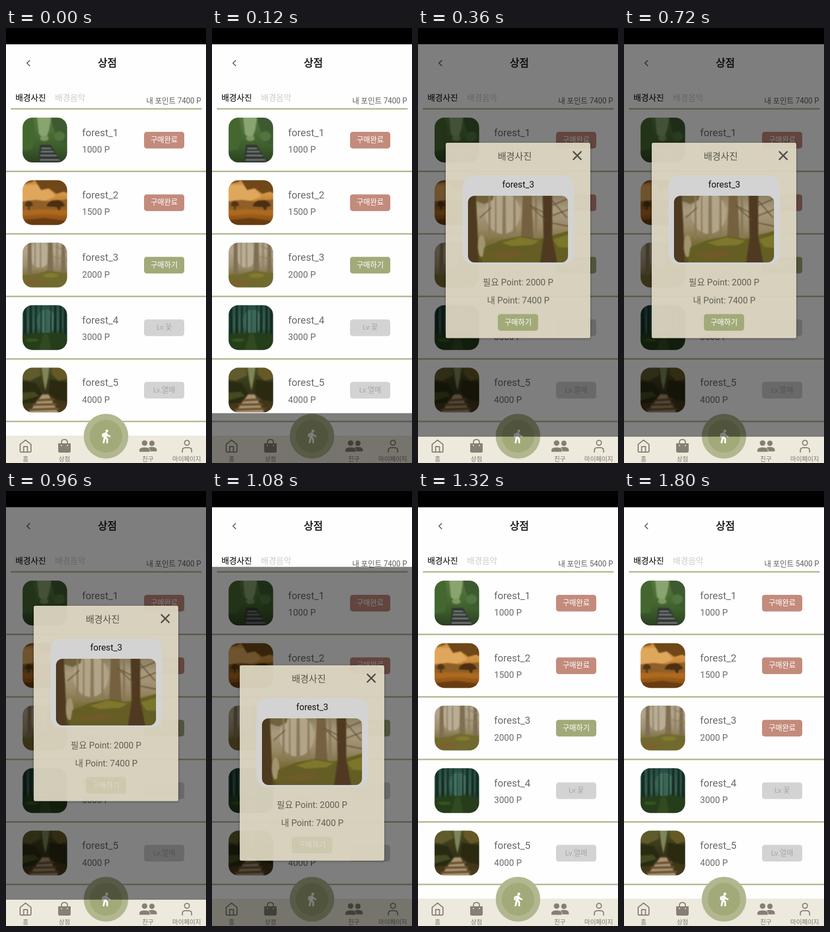
Write an HTML page that moves like this. It is 368 by 796 pixels and loops after 1920 ms.

```html
<!DOCTYPE html>
<html lang="ko">
<head>
<meta charset="utf-8">
<style>
html, body { margin: 0; width: 100%; height: 100%; overflow: hidden; background: #fefefe }
svg { display: block; width: 100vw; height: 100vh }
text { font-family: Roboto, "Noto Sans CJK KR", "Noto Sans CJK", sans-serif; white-space: pre }
.soft { filter: blur(1px) }
.modal { filter: drop-shadow(0 1px 2px #0006) }
</style>
</head>
<body>
<svg id="stage" viewBox="0 0 368 796"></svg>
<script>
const RED = '#c38b7c', GREEN = '#a2aa79', LINE = '#b2b790', GREY = '#d3d3d3', ICON = '#857f74';
const ROW = 114.4, LOOP = 1920, STEP = 120, SLIDE = 300, TOP = 29.8;

// Text is placed by the vertical centre of its glyphs.
const text = (x, cy, size, str, fill, anchor = 'middle', attrs = '') =>
  `<text x="${x}" y="${cy + size * .355}" font-size="${size}" fill="${fill}" text-anchor="${anchor}" ${attrs}>${str}</text>`;
const rect = (x, y, w, h, fill, r = 0, attrs = '') =>
  `<rect x="${x}" y="${y}" width="${w}" height="${h}" rx="${r}" fill="${fill}" ${attrs}/>`;
const path = (d, fill, attrs = '') => `<path d="${d}" fill="${fill}" ${attrs}/>`;
const oval = (x, y, rx, ry, fill) => `<ellipse cx="${x}" cy="${y}" rx="${rx}" ry="${ry}" fill="${fill}"/>`;
const stroke = (d, color, width) =>
  path(d, 'none', `stroke="${color}" stroke-width="${width}" stroke-linecap="round" stroke-linejoin="round"`);
const button = (x, y, label, fill, ink = '#fff', id = '') =>
  `<g id="${id}">${rect(x, y, 74, 30.5, fill, 5)}${text(x + 37, y + 14.3, 13.5, label, ink)}</g>`;
const trunks = (list, top, bottom, fill) =>
  list.map(([x, w]) => path(`M${x} ${top}h${w}l${w * .2} ${bottom - top}h${-w * 1.4}z`, fill)).join('');

let ids = 0;
function photo(x, y, w, h, r, colors, shapes) {
  const id = 'p' + ids++;
  const stops = colors.map((c, i) => `<stop offset="${i / (colors.length - 1)}" stop-color="${c}"/>`).join('');
  return `<linearGradient id="g${id}" x2="0" y2="1">${stops}</linearGradient>
    <clipPath id="${id}">${rect(0, 0, w, h, '#000', r)}</clipPath>
    <g transform="translate(${x} ${y})" clip-path="url(#${id})"><g class="soft">
    ${rect(-8, -8, w + 16, h + 16, `url(#g${id})`)}${shapes}</g></g>`;
}

const scenes = [
  [['#58773d', '#4d7038', '#3a5a2a', '#26391d'],
    path('M26 -8H54L49 22 42 42 30 30z', '#8aa471') + path('M50 -8H90V54L66 44 56 16z', '#3d5a30') +
    path('M-8 -8H18L24 30 18 58 -8 62z', '#44672f') + oval(68, 34, 10, 9, '#517540') +
    oval(40, 38, 8, 5, '#7d985d') + path('M32 50H52L76 90H28z', '#2f3430') +
    [55, 61, 68, 76].map((y, i) => path(`M${35 - i} ${y}h${16 + i * 6}l3 2.4h${-20 - i * 6}z`, '#868b8c')).join('')],
  [['#b57f3b', '#dda253', '#c0802f', '#9b5a19', '#70400f'],
    path('M-8 10L40 8 60 30 40 38 -8 40z', '#dfa75c') + path('M-8 40L24 36 50 39 90 34V54H-8z', '#8f5f27') +
    path('M18 -8H90V27L76 21 62 25 48 15 34 18z', '#6f4718') + path('M-8 -8H28L18 4 -8 9z', '#8a5a20') +
    path('M44 48Q48 36 60 37 72 34 78 47L70 49 69 55H66L63 49z', '#4c2e12') +
    path('M4 47Q6 37 12 38 18 38 19 47L13 48V55H10V48z', '#533416') +
    path('M-8 56L30 53 90 56V66L40 61-8 66z', '#ac691f') + path('M-8 74L40 69 90 76V90H-8z', '#683c10')],
  [['#aea189', '#b1a48b', '#9f9073', '#75692f', '#5d5625'],
    oval(32, 22, 18, 24, '#b9ad95') + trunks([[10, 6], [47, 8], [72, 6]], -8, 57, '#7f6e51') +
    trunks([[22, 2], [32, 2], [62, 3]], -8, 50, '#938467') + stroke('M60 6L88 20M58 26L86 32', '#8d7c5f', 1.5) +
    path('M-8 60L26 57 46 51 90 57V90H-8z', '#706a2f') + oval(52, 60, 14, 4, '#837b30') + oval(20, 73, 20, 5, '#7a6230')],
  [['#23483f', '#305a4e', '#3a634f', '#243d1d', '#1b2d12'],
    oval(44, 30, 18, 22, '#447160') +
    trunks([[2, 5], [13, 4], [23, 3], [33, 2], [51, 2], [58, 4], [68, 4], [76, 5]], -8, 58, '#142b23') +
    trunks([[29, 1], [41, 2], [46, 1]], -8, 50, '#254a3d') +
    path('M-8 54L30 51 60 50 90 55V90H-8z', '#253d1a') + path('M38 53H47L54 90H28z', '#324a22') + oval(18, 64, 12, 3, '#38551f')],
  [['#5a572d', '#3f401d', '#34331a', '#423619', '#4c3c20'],
    path('M34 -8H50L47 18 42 42 38 24z', '#7f8558') + path('M-8 -8H30L34 14 14 24 -8 20z', '#5f5b2c') +
    path('M54 -8H90V18L66 24 54 12z', '#655a25') + path('M-8 24L24 28 36 48 20 64-8 66z', '#282a12') +
    path('M50 22L90 28V64L62 58 48 46z', '#2c2911') + path('M-8 46L22 44 30 52 -8 62z', '#454820') +
    path('M36 49H48L70 90H6z', '#ab9270') +
    path('M28 58L56 56 60 60 25 62zM20 66L61 65 64 69 17 70zM12 75L65 73 69 77 10 79z', '#65502f')]
];

const glade = photo(92, 307, 184, 122, 12, ['#85775a', '#a89b7d', '#988664', '#706528', '#4f461a'],
  oval(64, 32, 32, 38, '#b1a488') + path('M-8 -8H50L45 8 30 15 10 8z', '#70623a') +
  trunks([[38, 3], [50, 2], [64, 5], [84, 3], [123, 4]], -8, 78, '#8a7959') + trunks([[101, 16]], -8, 77, '#75603f') +
  path('M-8 -8H14L17 50 20 130H-8z', '#4d3a1f') + oval(25, 92, 7, 20, '#a39470') +
  path('M30 94L62 81 98 74 132 79 192 62V130H24z', '#645e24') + path('M62 86L96 76 132 82 118 90 80 92z', '#7f772c') +
  path('M156 80L192 68V96L166 94z', '#7a762a') + path('M34 108L84 99 110 107 66 115z', '#705a29') +
  path('M137 -8H155L155 76 165 126H132L139 78z', '#4f3a21') +
  stroke('M156 17L190 3M156 36L190 23M138 30L114 18M156 50L190 57M119 23L144 45M154 8L182 40M22 40L42 22', '#5c4a2e', 1.6));

const goods = [['1000', '구매완료', RED], ['1500', '구매완료', RED], ['2000', '구매하기', GREEN],
  ['3000', 'Lv.꽃', GREY, '#a6a6a6'], ['4000', 'Lv.열매', GREY, '#a6a6a6']];

const rows = goods.map(([price, label, fill, ink], i) => {
  const y = i * ROW;
  return photo(30.5, 164 + y, 82, 82, 18, ...scenes[i]) +
    text(140, 191 + y, 18.4, 'forest_' + (i + 1), '#6b6b6b', 'start') +
    text(140, 222.3 + y, 16.3, price + ' P', '#6b6b6b', 'start') +
    button(254, 190 + y, label, fill, ink, 'buy' + i) +
    rect(0, 261 + y, 368, 2.7, LINE);
}).join('');

const header = stroke('M43.5 59.5L38.5 64.2 43.5 69', '#666', 1.8) +
  text(186.5, 64.5, 19, '상점', '#111', 'middle', 'stroke="#111" stroke-width=".5"') +
  text(17.5, 128, 15.2, '배경사진', '#111', 'start', 'stroke="#111" stroke-width=".15"') +
  text(90, 128, 15.2, '배경음악', '#cbcbcb', 'start') +
  text(359, 132.8, 13.85, '', '#5f5f5f', 'end', 'id="points"') + rect(9, 146.6, 351, 2.7, LINE);

const friend = (x, y, s) => `<g transform="translate(${x} ${y}) scale(${s})">
  <circle cy="5.5" r="5.5" fill="${ICON}"/>${path('M-10 22v-3c0-4 4-6 10-6s10 2 10 6v3z', ICON)}</g>`;

const nav = rect(0, 746, 368, 50, '#ede9dc') +
  stroke('M26 762L36 754 46 762V774Q46 776 44 776H28Q26 776 26 774zM32.5 776V766H39.5V776', ICON, 2) +
  path('M96 760H119V774Q119 777 116 777H99Q96 777 96 774z', ICON) +
  stroke('M102 764V758Q102 753 107.5 753T113 758V764', ICON, 2) +
  path('M101 763h2v2h-2zM112 763h2v2h-2z', '#ede9dc') +
  friend(268.5, 755, .9) + `<g stroke="#ede9dc" stroke-width="1">${friend(255, 754, 1)}</g>` +
  stroke('M324.5 776V773Q324.5 768 330 768H336Q341.5 768 341.5 773V776', ICON, 2) +
  `<circle cx="333" cy="759" r="4.5" fill="none" stroke="${ICON}" stroke-width="2"/>` +
  [[36, '홈'], [107.5, '상점'], [261, '친구'], [332.5, '마이페이지']].map(([x, s]) => text(x, 789, 11.5, s, '#7d776d')).join('') +
  `<circle cx="184" cy="747" r="41" fill="${LINE}"/><circle cx="184" cy="747" r="30" fill="${GREEN}"/>` +
  path('M13.5 5.5a2 2 0 1 0 0-4 2 2 0 0 0 0 4zM9.8 8.9L7 23h2.1l1.8-8 2.1 2v6h2v-7.5l-2.1-2 .6-3C14.8 12 16.8 13 19 13v-2c-1.9 0-3.5-1-4.3-2.4l-1-1.6c-.4-.6-1-1-1.7-1-.3 0-.5.1-.8.1L6 8.3V13h2V9.6z',
    '#fff', 'stroke="#fff" stroke-width=".8" stroke-linejoin="round" transform="translate(170.3 733.5) scale(1.13)"');

const modal = `<g id="sheet">${rect(0, TOP, 368, 718, '#000', 0, 'opacity=".5"')}
  ${rect(51, 210, 266, 357.5, 'rgba(227,221,199,.92)', 3, 'class="modal"')}
  ${text(178, 235, 17, '배경사진', '#57554c')}
  ${stroke('M286 226.5L300 240.5M300 226.5L286 240.5', '#514f48', 2.6)}
  ${rect(82, 270, 205, 163, GREY, 20)}${text(184.5, 286, 16.2, 'forest_3', '#111')}${glade}
  ${text(184, 465.5, 16.2, '필요 Point: 2000 P', '#615f56')}${text(184.5, 498, 16.2, '내 Point: 7400 P', '#615f56')}
  ${button(147, 523.5, '구매하기', GREEN, '#fff', 'confirm')}</g>`;

const $ = id => document.getElementById(id);
$('stage').innerHTML = rect(0, 0, 368, 796, '#fefefe') + header + rows + nav + modal + rect(0, 0, 368, TOP, '#000');

const ease = x => (1 - Math.cos(Math.PI * Math.min(1, Math.max(0, x)))) / 2;
const [buyBox, buyLabel] = $('buy2').children;
const start = performance.now();

function draw() {
  const t = Math.floor((performance.now() - start) % LOOP / STEP) * STEP;
  const hidden = 1 - ease((t - 52.5) / SLIDE) + ease((t - 1006) / SLIDE);
  $('sheet').setAttribute('transform', `translate(0 ${Math.round(767 * hidden)})`);
  $('confirm').setAttribute('opacity', t >= 960 ? .2 : 1);
  $('points').textContent = `내 포인트 ${t < 1320 ? 7400 : 5400} P`;
  const bought = t >= 1560;
  buyBox.setAttribute('fill', bought ? RED : GREEN);
  buyLabel.textContent = bought ? '구매완료' : '구매하기';
  requestAnimationFrame(draw);
}
draw();
</script>
</body>
</html>
```
